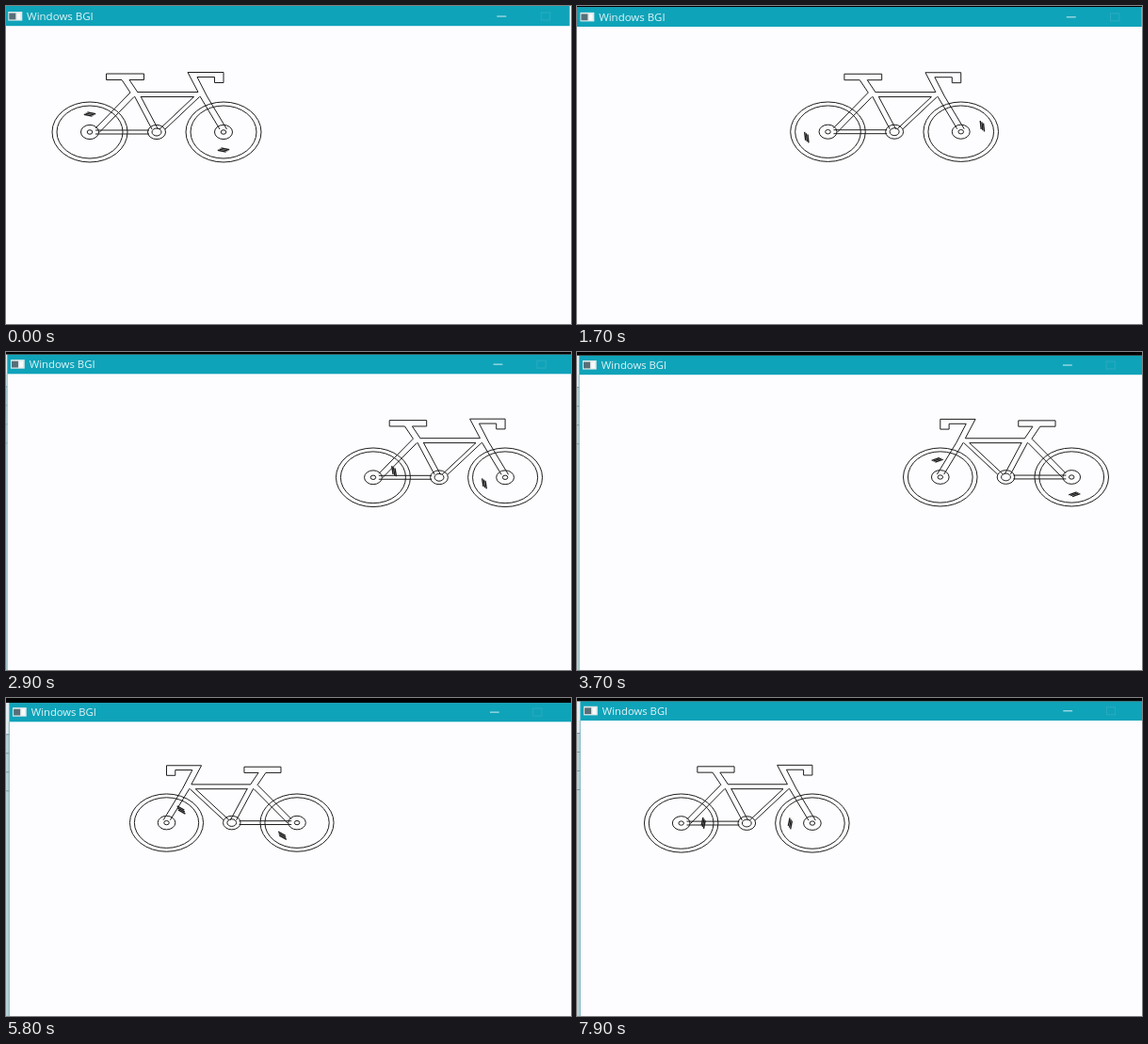
An HTML page with a canvas that plays this animation: 600 px wide and 338 px high, repeating every 8000 ms.

```html
<!DOCTYPE html>
<html lang="en">
<head>
<meta charset="utf-8">
<title>Bicycle</title>
<style>
html, body { margin: 0; width: 100%; height: 100%; overflow: hidden; background: #fdfcfe; }
canvas { display: block; width: 600px; height: 338px; }
</style>
</head>
<body>
<canvas id="stage"></canvas>
<script>
const W = 600, H = 338, LOOP = 8000, STEP = 100;
const START = 160, LEFT = 99.7, RIGHT = 503.2, SPEED = 10.45;
const HUB = 71;              // crank to wheel hub
const SPIN = 14.8;           // degrees per step
const INK = '#1e1e1e', PAPER = '#fdfcfe', TEAL = '#0fa3b9';
const rad = deg => deg * Math.PI / 180;

const canvas = document.getElementById('stage');
const ctx = canvas.getContext('2d');
const dpr = window.devicePixelRatio || 1;
canvas.width = W * dpr;
canvas.height = H * dpr;

function rect(x, y, w, h, color) {
  ctx.fillStyle = color;
  ctx.fillRect(x, y, w, h);
}

// The handheld camera slides one way and sways up and back
function camera(n) {
  const k = Math.min(n / 54, 1);
  const slide = k * k * (3 - 2 * k);
  const sway = Math.sin(Math.PI * n / 114) ** 2;
  const titleX = 22 + 4.8 * slide;
  const sx = (526 - 7.5 * sway - titleX) / 504;
  return {
    sx, titleX,
    sy: 1 - 0.042 * sway,
    top: 5.1 * sway,
    bottom: 21.2 + 4.1 * sway,
    hubY: 134 - 1.4 * sway,
    toX: x => titleX + (x - 22) * sx
  };
}

// Back and forth between the two ends, mirrored on the way back
function ride(n) {
  const span = RIGHT - LEFT;
  const way = (START - LEFT + SPEED * n) % (2 * span);
  return way < span
    ? { x: LEFT + way, dir: 1 }
    : { x: RIGHT + span - way, dir: -1 };
}

function drawBike(n, cam) {
  const { x, dir } = ride(n);
  const place = (px, py) => [cam.toX(x) + dir * px * cam.sx, cam.hubY + py * cam.sy];

  const line = (...pts) => {
    ctx.beginPath();
    for (let i = 0; i < pts.length; i += 2) ctx.lineTo(...place(pts[i], pts[i + 1]));
    ctx.stroke();
  };
  // Two parallel lines, the second moved by (gx, gy)
  const tube = (x1, y1, x2, y2, gx, gy) => {
    line(x1, y1, x2, y2);
    line(x1 + gx, y1 + gy, x2 + gx, y2 + gy);
  };
  const ring = (cx, r) => {
    ctx.beginPath();
    ctx.ellipse(...place(cx, 0), r * cam.sx, r * 0.8 * cam.sy, 0, 0, Math.PI * 2);
    ctx.stroke();
  };
  // Short strokes that circle the hub, leaning a little off the tangent
  const mark = (hub, angle) => {
    const cx = hub + 24 * Math.cos(angle), cy = 19 * Math.sin(angle);
    const lean = angle + rad(102);
    const c = Math.cos(lean), s = Math.sin(lean);
    for (const off of [-1.5, 0, 1.5]) {
      const a = -4.5 - off, b = 4.5 - off;
      line(cx + a * c - off * s, cy + a * s + off * c,
           cx + b * c - off * s, cy + b * s + off * c);
    }
  };

  ctx.strokeStyle = INK;
  ctx.lineWidth = 1;
  for (const hub of [-HUB, HUB]) {
    for (const r of [40, 35, 9.5, 2.8]) ring(hub, r);
  }
  ring(0, 9.5);
  ring(0, 5);

  line(-37, -55.5, -53.5, -55.5, -53.5, -62, -13.5, -62, -13.5, -55.5, -29, -55.5);   // saddle
  line(44, -42.5, 33, -63.5, 71, -63.5, 71, -52.5, 61.5, -52.5, 61.5, -58.5, 43, -58.5, 53.5, -38);   // handlebar
  line(-20, -42.5, 44, -42.5);
  line(-17, -37.5, 39.5, -37.5);
  tube(-37, -55.5, -28, -42, 8, 0);      // seat post
  tube(-23.5, -38, -5, -3, 6.5, 0);      // seat tube
  tube(-28, -42, -65, -4, 4, 4.5);       // seat stay
  tube(39.5, -37.5, 3, -3, 6, 0);        // down tube
  tube(46, -38, 67, -3, 7.5, 0);         // fork
  tube(-8, -2, -65, -2, 0, 4);           // chain stay

  const angle = rad(270 + SPIN * n);
  ctx.lineWidth = 1.4;
  mark(-HUB, angle);
  mark(HUB, angle + Math.PI);
}

function drawWindow({ titleX, sx, top, bottom, toX }) {
  const left = titleX - 23.4;
  const mid = bottom - 10.4;

  // Sliver of desktop beside the window
  if (left > 0) {
    rect(0, top, left, H, '#e3ecef');
    rect(0, bottom + 13, left, H, '#b9d2d6');
    for (let y = 13; y < 80; y += 20) rect(0, bottom + y, left, 1, '#7f959e');
  }
  rect(left - 0.6, bottom, 0.9, H, '#76aeb9');

  rect(left, top, W, bottom - top, TEAL);
  rect(0, 0, W, top, '#000');

  // Icon
  const ix = titleX - 19.7;
  rect(ix, mid - 4.8, 15 * sx, 9.6, '#dfe9ea');
  rect(ix + 1, mid - 3.2, 7, 6.8, '#596f78');
  rect(ix + 9.5, mid - 3.2, 3.6, 6.8, '#f7fafa');

  // Title
  ctx.save();
  ctx.translate(titleX, mid + 4);
  ctx.scale(sx, 1);
  ctx.font = '11.5px "Open Sans", "Noto Sans", sans-serif';
  ctx.fillStyle = '#e2f5f7';
  ctx.fillText('Windows BGI', 0, 0);
  ctx.restore();

  // Buttons
  rect(toX(521.3), mid - 0.3, 10 * sx, 1, '#d2eef2');
  ctx.strokeStyle = '#2fabbf';
  ctx.lineWidth = 0.9;
  ctx.strokeRect(toX(568.3), mid - 3.8, 9.4 * sx, 8);
}

function draw(ms) {
  const n = Math.floor((ms % LOOP) / STEP);
  const cam = camera(n);

  ctx.setTransform(dpr, 0, 0, dpr, 0, 0);
  rect(0, 0, W, H, PAPER);
  drawWindow(cam);

  ctx.save();
  ctx.beginPath();
  ctx.rect(cam.titleX - 23, cam.bottom, W, H);
  ctx.clip();
  drawBike(n, cam);
  ctx.restore();
}

const start = performance.now();
function tick() {
  draw(performance.now() - start);
  requestAnimationFrame(tick);
}
tick();
</script>
</body>
</html>
```
